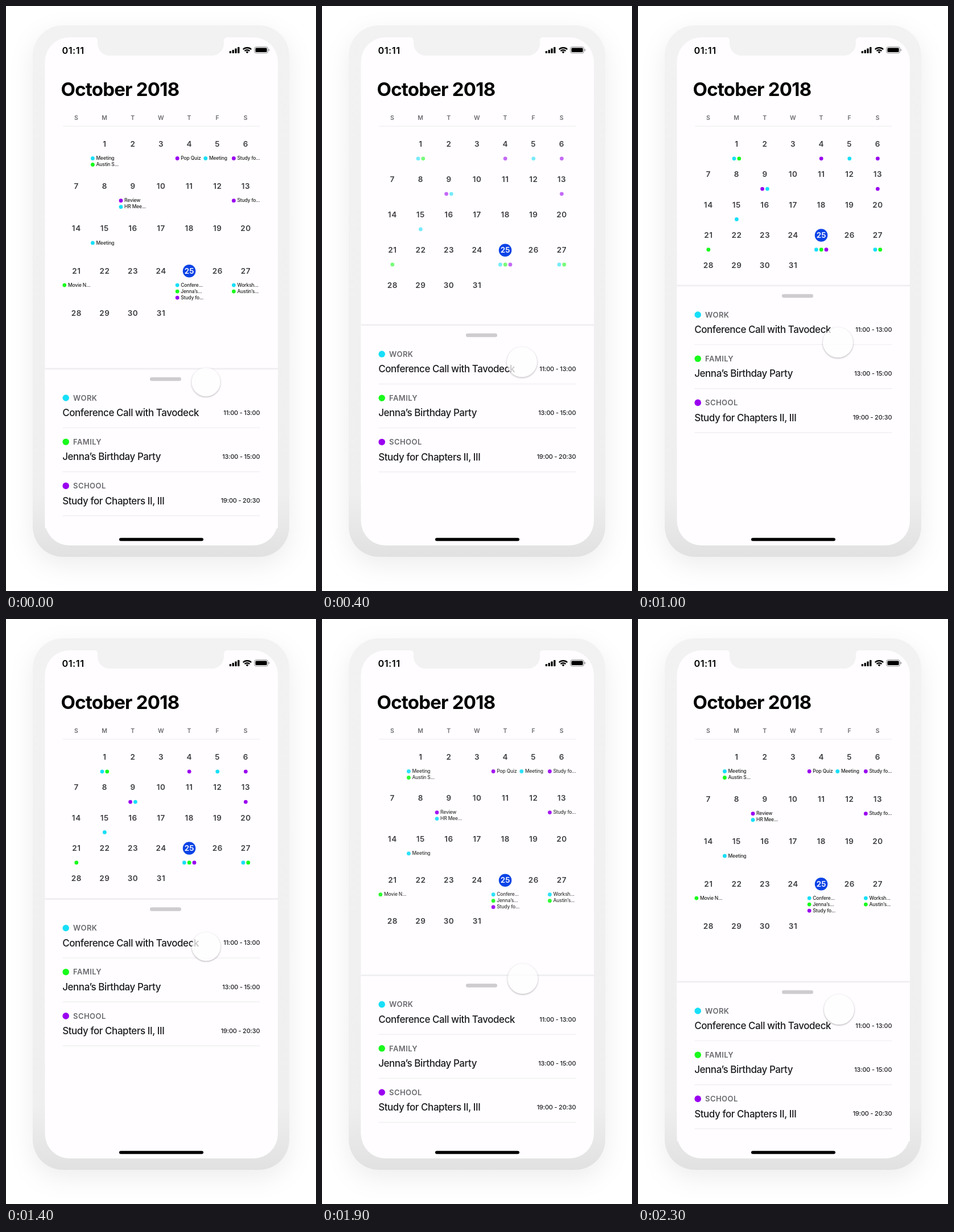
An HTML page that plays this animation: 545x1027 px, repeating every 2.4 s.

```html
<!DOCTYPE html>
<html lang="en">
<head>
<meta charset="utf-8">
<title>Calendar sheet</title>
<style>
@property --spread { syntax: '<number>'; inherits: true; initial-value: 1; }
@property --lift { syntax: '<number>'; inherits: true; initial-value: 0; }
@property --compact { syntax: '<number>'; inherits: true; initial-value: 0; }

html, body { margin: 0; width: 100%; height: 100%; overflow: hidden; background: #fff; }
body { position: relative; }
svg {
  display: block; width: 545px; height: 1027px;
  font-family: Inter, 'Open Sans', sans-serif;
  animation: spread 2400ms infinite, lift 2400ms infinite, compact 2400ms step-end infinite;
}
.body { filter: drop-shadow(0 14px 22px rgba(0,0,0,.07)); }
.month { font: 700 33px Inter, sans-serif; letter-spacing: -.78px; }
.clock { font: 600 16.3px Inter, sans-serif; letter-spacing: .5px; }
.weekday { font-size: 10.5px; font-weight: 600; fill: #6c6b70; text-anchor: middle; }
.date { font-size: 13.5px; font-weight: 600; letter-spacing: .6px; fill: #3d3c40; text-anchor: middle; }
.date.today { fill: #fff; letter-spacing: 0; }
.event { font-size: 8.5px; font-weight: 500; letter-spacing: -.18px; fill: #222; }
.kind { font-size: 13px; font-weight: 600; letter-spacing: .45px; fill: #69686d; }
.title { font-size: 17px; font-weight: 500; letter-spacing: -.44px; fill: #1d1c1f; }
.hours { font-size: 11px; font-weight: 500; letter-spacing: -.2px; fill: #1d1c1f; text-anchor: end; }
.rule { stroke: #eeecef; stroke-width: 1.2; }

.week { transform: translateY(calc(var(--i) * (53.3px + 20.9px * var(--spread)))); }
.labels { opacity: calc(var(--spread) * (1 - var(--compact))); }
.dots { opacity: calc((1 - var(--spread)) * var(--compact)); }
.sheet { transform: translateY(calc(-146px * var(--lift))); }

.touch {
  position: absolute; left: -26.3px; top: -26.3px; width: 52.6px; height: 52.6px;
  border-radius: 50%; background: rgba(255,254,255,.75);
  box-shadow: 0 1px 3px rgba(0,0,0,.36);
  animation: drag 2400ms infinite, press 2400ms linear infinite;
}

@keyframes spread {
  0% { --spread: 1; animation-timing-function: cubic-bezier(.38, 0, .5, 1); }
  33.33% { --spread: 0; }
  58.54% { --spread: 0; animation-timing-function: ease; }
  91.9%, 100% { --spread: 1; }
}
@keyframes lift {
  0% { --lift: 0; animation-timing-function: cubic-bezier(.38, 0, .58, 1); }
  33.33% { --lift: 1; }
  58.13% { --lift: 1; animation-timing-function: ease; }
  90%, 100% { --lift: 0; }
}
@keyframes compact {
  0% { --compact: 0; }
  1% { --compact: 1; }
  58.6%, 100% { --compact: 0; }
}
@keyframes drag {
  0% { translate: 351px 660px; animation-timing-function: ease-out; }
  7% { translate: 351px 624.5px; }
  30.8% { translate: 351px 624.5px; animation-timing-function: ease-in-out; }
  51.25% { translate: 351px 563px; }
  55.5% { translate: 351px 563px; animation-timing-function: ease-in; }
  58.33% { translate: 351.3px 574px; animation-timing-function: ease-out; }
  65.5% { translate: 352.3px 624.5px; }
  75% { translate: 352.3px 624.5px; animation-timing-function: ease-in-out; }
  93.3%, 96.5% { translate: 353px 685px; animation-timing-function: ease-in; }
  100% { translate: 351px 660px; }
}
@keyframes press {
  0%, 7% { scale: .95; }
  11%, 51.25% { scale: 1; }
  55.5%, 65.5% { scale: .95; }
  69.5%, 95.85% { scale: 1; }
  100% { scale: .95; }
}
</style>
</head>
<body>
<svg viewBox="0 0 545 1027">
  <defs>
    <linearGradient id="shell" x1="0" y1="0" x2="0" y2="1">
      <stop offset="0" stop-color="#f2f2f2"/>
      <stop offset=".88" stop-color="#efefef"/>
      <stop offset="1" stop-color="#e1e1e1"/>
    </linearGradient>
  </defs>
  <rect class="body" x="47" y="34" width="451" height="933" rx="53" fill="url(#shell)"/>
  <rect x="68.5" y="55" width="409.5" height="892" rx="43" fill="#fffdff"/>
  <path d="M154 54.5c5 .5 7 2.5 7 7.5v4a21 21 0 0 0 21 21h180a21 21 0 0 0 21-21v-4c0-5 2-7 7-7.5z" fill="#f2f2f2"/>

  <text class="clock" x="98.5" y="84">01:11</text>
  <g id="signal"></g>
  <g fill="none" stroke="#000" stroke-width="2.3">
    <path d="M416.8 76.2a10.3 10.3 0 0 1 14.4 0M419.5 79a6.6 6.6 0 0 1 9 0"/>
    <path d="M421.6 80.7a3.4 3.4 0 0 1 4.8 0l-2.4 2.5z" fill="#000" stroke="none"/>
  </g>
  <rect x="436.8" y="71.8" width="23.6" height="11" rx="3" fill="none" stroke="#8a898c"/>
  <rect x="438.5" y="73.5" width="20.2" height="7.6" rx="1.6"/>
  <path d="M461.6 75.3q1.6 .5 1.6 2t-1.6 2z" fill="#8a898c"/>

  <text class="month" x="96.5" y="158">October 2018</text>
  <g id="calendar"></g>
  <path class="rule" d="M100 211H446.5"/>

  <g class="sheet" id="sheet">
    <rect x="68.5" y="637" width="409.5" height="280" fill="#fffdff"/>
    <rect x="68.5" y="635.5" width="409.5" height="2.8" fill="#f0eef1"/>
    <rect x="253" y="651.7" width="55" height="6.5" rx="3.25" fill="#cecccf"/>
  </g>
  <rect x="199" y="933.8" width="148" height="5.4" rx="2.7"/>
</svg>
<div class="touch"></div>

<script>
const WORK = '#17dff8', FAMILY = '#18fa1c', SCHOOL = '#9a00f0';
const TODAY = 25;
const events = {
  1: [[WORK, 'Meeting'], [FAMILY, 'Austin S...']],
  4: [[SCHOOL, 'Pop Quiz']],
  5: [[WORK, 'Meeting']],
  6: [[SCHOOL, 'Study fo...']],
  9: [[SCHOOL, 'Review'], [WORK, 'HR Mee...']],
  13: [[SCHOOL, 'Study fo...']],
  15: [[WORK, 'Meeting']],
  21: [[FAMILY, 'Movie N...']],
  25: [[WORK, 'Confere...'], [FAMILY, 'Jenna’s...'], [SCHOOL, 'Study fo...']],
  27: [[WORK, 'Worksh...'], [FAMILY, 'Austin’s...']]
};
const agenda = [
  [WORK, 'WORK', 'Conference Call with Tavodeck', '11:00 - 13:00'],
  [FAMILY, 'FAMILY', 'Jenna’s Birthday Party', '13:00 - 15:00'],
  [SCHOOL, 'SCHOOL', 'Study for Chapters II, III', '19:00 - 20:30']
];

const text = (cls, x, y, value) => `<text class="${cls}" x="${x}" y="${y}">${value}</text>`;
const dot = (x, y, r, color) => `<circle cx="${x}" cy="${y}" r="${r}" fill="${color}"/>`;
const columnX = i => 123.5 + 49.6 * i;
const append = (id, markup) => document.getElementById(id).insertAdjacentHTML('beforeend', markup);

function dayCell(day) {
  const x = columnX(day % 7), list = events[day] || [];
  const labels = list.map(([color, name], i) =>
    dot(x - 20.7, 267.5 + 11 * i, 3.4, color) + text('event', x - 14.6, 270.2 + 11 * i, name));
  const dots = list.map(([color], i) =>
    dot(x + .3 + 8.8 * (i - (list.length - 1) / 2), 267.8, 3.4, color));
  const isToday = day === TODAY;
  return (isToday ? dot(x + .2, 242.6, 11.3, '#0b43e6') : '')
    + text(isToday ? 'date today' : 'date', x + .3, 247, day)
    + `<g class="labels">${labels.join('')}</g><g class="dots">${dots.join('')}</g>`;
}

append('calendar', [...'SMTWTFS'].map((d, i) => text('weekday', columnX(i), 199.7, d)).join(''));
for (let week = 0; week < 5; week++) {
  let cells = '';
  for (let day = Math.max(1, week * 7); day < week * 7 + 7 && day <= 31; day++) cells += dayCell(day);
  append('calendar', `<g class="week" style="--i:${week}">${cells}</g>`);
}

agenda.forEach(([color, kind, title, hours], i) => {
  const y = 688 + 77.2 * i;
  append('sheet', dot(105.2, y, 5.8, color)
    + text('kind', 118, y + 4.7, kind)
    + text('title', 99.2, y + 32.2, title)
    + text('hours', 446.3, y + 30, hours)
    + `<path class="rule" d="M99.5 ${y + 52.5}H446.5"/>`);
});

append('signal', [4, 6, 8.5, 11].map((h, i) =>
  `<rect x="${392.8 + 4.8 * i}" y="${83 - h}" width="3.3" height="${h}" rx=".8"/>`).join(''));
</script>
</body>
</html>
```
